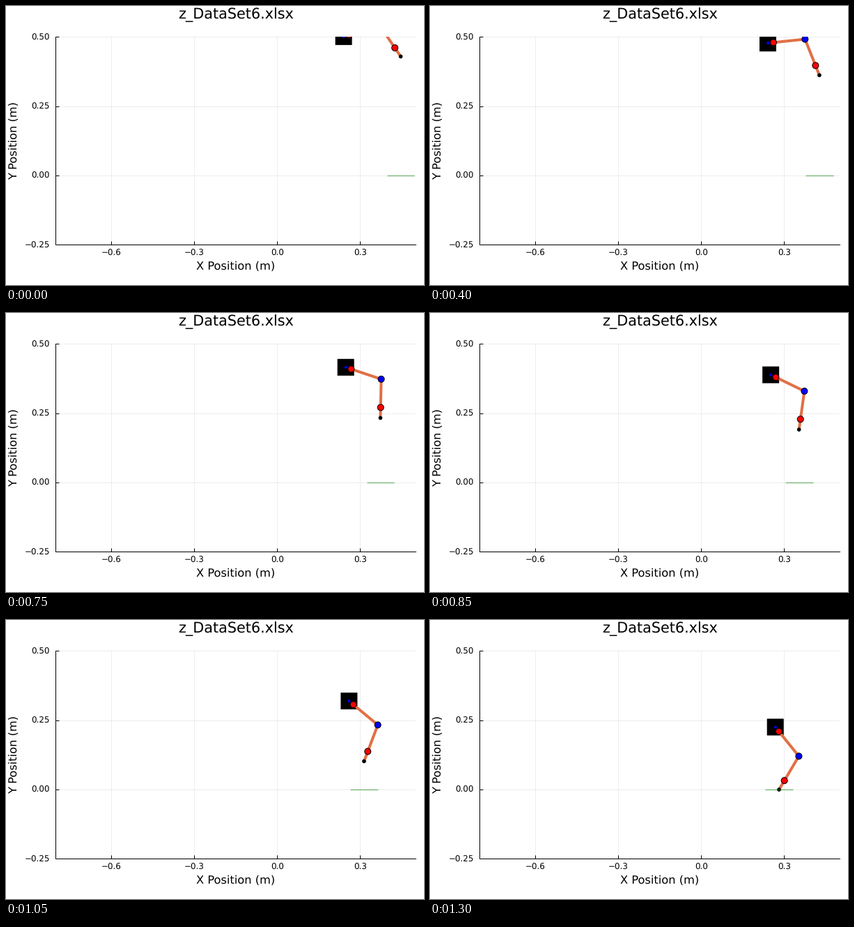
A matplotlib script that plays this animation: 600x400 px, repeating every 1.4 s.

```python
import numpy as np
import matplotlib.pyplot as plt
from matplotlib.animation import FuncAnimation
from matplotlib.patches import Circle, Rectangle

plt.rcParams.update({"font.family": "DejaVu Sans", "text.hinting": "none"})
PX = 0.72                    # points per pixel at 100 dpi
SCALE = 397.4                # pixels per metre
W, H = 600, 400
LEFT, RIGHT, TOP, BOTTOM = 71.3, 587.9, 44.3, 342.35
THIGH, SHANK = 0.135, 0.140  # link lengths in metres
BODY = 24 / SCALE
STEP, FRAMES = 50, 28

# The leg drops from rest, so every coordinate is a polynomial in t squared.
TIMES = np.array([0, 0.4, 0.6, 0.75, 0.95, 1.15, 1.3])


def fit(*values):
    return np.poly1d(np.polyfit(TIMES ** 2, values, 4))


body_x = fit(0.2403, 0.2406, 0.2441, 0.2479, 0.2554, 0.2637, 0.2680)
body_y = fit(0.5008, 0.4781, 0.4479, 0.4152, 0.3566, 0.2793, 0.2252)
thigh_deg = fit(19.1, 5.9, -7.45, -18.4, -33.1, -45.7, -51.1)
shank_deg = fit(34.2, 21.7, 9.0, -1.0, -14.7, -26.0, -30.7)

fig = plt.figure(figsize=(W / 100, H / 100), dpi=100, facecolor="white")
ax = fig.add_axes([LEFT / W, 1 - BOTTOM / H,
                   (RIGHT - LEFT) / W, (BOTTOM - TOP) / H])
ax.set(xlim=(-0.8, 0.5), ylim=(-0.25, 0.5), xticks=[-0.6, -0.3, 0, 0.3],
       yticks=[-0.25, 0, 0.25, 0.5])
ax.tick_params(direction="in", length=5 * PX, width=PX,
               labelbottom=False, labelleft=False)
ax.grid(color="black", alpha=0.1, linewidth=0.65 * PX)
ax.set_axisbelow(True)
ax.spines[["top", "right"]].set_visible(False)
ax.spines[["left", "bottom"]].set_linewidth(PX)


def label(x, y, text, size, ha="center", rotation=0):
    fig.text(x / W, 1 - y / H, text, fontsize=size * PX, ha=ha, va="baseline",
             rotation=rotation, rotation_mode="anchor")


def number(value, digits):
    return f"{value:.{digits}f}".replace("-", "\u2212")


label(329.6, 18, "z_DataSet6.xlsx", 20.75)
label(329.8, 378, "X Position (m)", 16.3)
label(15.6, 193, "Y Position (m)", 16.3, rotation=90)
for x in ax.get_xticks():
    label(389.2 + x * SCALE, 358, number(x, 1), 11.85)
for y in ax.get_yticks():
    label(63.1, 247.3 - y * SCALE, number(y, 2), 11.85, ha="right")


def line(color, width, **kw):
    return ax.plot([], [], color=color, lw=width * PX,
                   solid_capstyle="butt", **kw)[0]


def dot(color, size):
    return ax.add_patch(Circle((0, 0), size / 2 / SCALE, fc=color, ec="black",
                               lw=PX, zorder=2))


body = ax.add_patch(Rectangle((0, 0), BODY, BODY, fc="black", lw=0,
                              zorder=2, snap=False))
link = line("blue", 3)
leg = line("#e26f46", 4)
center = dot("blue", 5)
hip_dot = dot("red", 9)
knee_dot = dot("blue", 9)
shin_dot = dot("red", 9)
foot_dot = dot("black", 4.6)
ground = line("green", 1.4, alpha=0.5)


def draw(i):
    u = (min(i, FRAMES - 2) * STEP / 1000) ** 2
    a, b = np.radians([thigh_deg(u), shank_deg(u)])
    base = np.array([body_x(u), body_y(u)])
    knee = base + THIGH * np.array([np.cos(a), np.sin(a)])
    foot = knee + SHANK * np.array([np.sin(b), -np.cos(b)])
    hip = base + 0.15 * (knee - base)
    shin = knee + 0.73 * (foot - knee)

    body.set_xy(base - BODY / 2)
    for mark, point in ((center, base), (hip_dot, hip), (knee_dot, knee),
                        (shin_dot, shin), (foot_dot, foot)):
        mark.set_center(point)
    link.set_data(*zip(base, hip))
    leg.set_data(*zip(hip, knee, foot))
    ground.set_data([foot[0] - 0.05, foot[0] + 0.05], [0, 0])
    return body, link, leg, center, hip_dot, knee_dot, shin_dot, foot_dot, ground


anim = FuncAnimation(fig, draw, frames=FRAMES, interval=STEP,
                     repeat=True, repeat_delay=0, blit=False)
plt.show()
```
